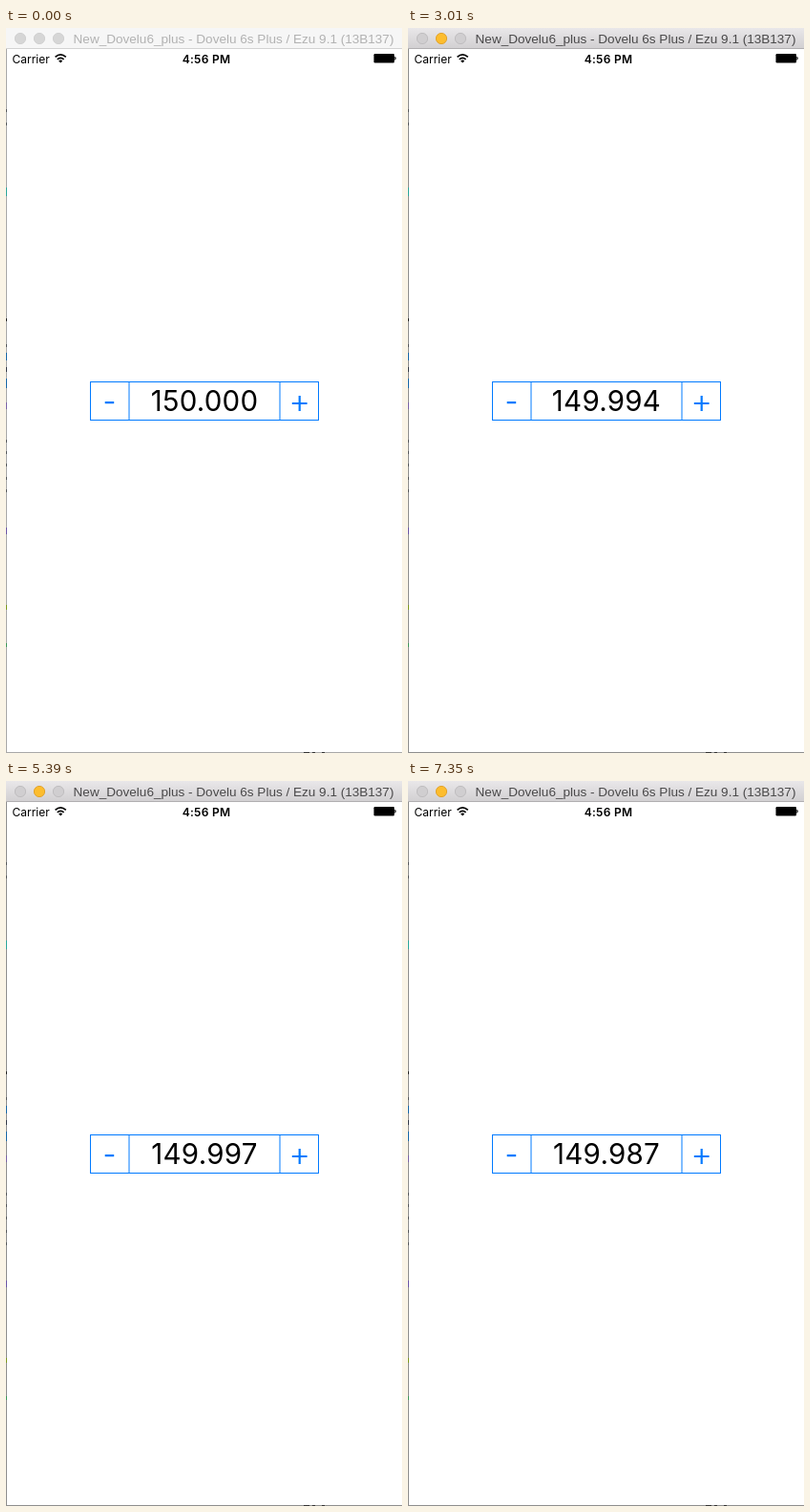
Animation, 415 px wide and 759 px high, one loop 8400 ms. Source, as an HTML page:

```html
<!DOCTYPE html>
<html lang="en">
<head>
<meta charset="utf-8">
<title>Stepper</title>
<style>
  html, body { margin: 0; width: 100%; height: 100%; overflow: hidden; background: #fff; }
  svg { display: block; width: 415px; height: 759px; }
  text { font-family: Inter, Roboto, sans-serif; }
  #title { font: 13.55px "Liberation Sans", Arial, sans-serif; }
  #value { font-size: 29.5px; letter-spacing: .25px; }
  .status { font-size: 12px; }
  .clock { font-weight: 600; letter-spacing: .25px; }
</style>
</head>
<body>
<svg viewBox="0 0 415 759" xmlns="http://www.w3.org/2000/svg">
  <defs>
    <linearGradient id="bar" x1="0" y1="0" x2="0" y2="1">
      <stop offset="0" stop-color="#e9e7e9"/>
      <stop offset="1" stop-color="#d2d0d2"/>
    </linearGradient>
  </defs>
  <rect width="415" height="759" fill="#fff"/>

  <!-- window frame -->
  <rect id="head" width="415" height="21"/>
  <rect id="rule" y="21" width="415" height="1"/>
  <g id="lights" stroke-width="1">
    <circle cx="15" cy="11" r="5.6"/>
    <circle cx="35" cy="11" r="5.6"/>
    <circle cx="55" cy="11" r="5.6"/>
  </g>
  <text id="title" x="238.5" y="16" text-anchor="middle">New_Dovelu6_plus - Dovelu 6s Plus / Ezu 9.1 (13B137)</text>
  <g id="edge">
    <rect y="22" width="1" height="737"/>
    <rect y="758" width="415" height="1"/>
  </g>
  <g id="specks"></g>

  <!-- status bar -->
  <text class="status" x="6.5" y="37">Carrier</text>
  <g fill="none" stroke="#000" stroke-width="1.7">
    <path d="M51.6 30.4Q57.2 25.4 62.8 30.4"/>
    <path d="M53.8 32.8Q57.2 29.8 60.6 32.8"/>
  </g>
  <path d="M55.2 34.4Q57.2 32.8 59.2 34.4L57.2 36.6Z"/>
  <text class="status clock" x="210" y="37" text-anchor="middle">4:56 PM</text>
  <rect x="385.5" y="27" width="21.5" height="9.5" rx="1.2"/>
  <path d="M407.7 30Q409.4 31.7 407.7 33.5Z" stroke="#000" stroke-width=".5"/>

  <!-- stepper -->
  <g fill="none" stroke="#007aff">
    <rect x="88.5" y="370.5" width="239" height="40"/>
    <path d="M129 371V410M287 371V410"/>
    <path d="M103.7 392.2H113.2M299.8 393H315.6M307.7 385.1V400.9" stroke-width="2.2"/>
  </g>
  <text id="value" x="208" y="400.5" text-anchor="middle">150.000</text>
</svg>
<script>
const LOOP = 8400, FOCUS = 1400;
const downs = [1400, 1680, 2030, 2310, 2660, 3010, 5250, 5390, 5740, 5950,
  6090, 6230, 6580, 6720, 6860, 7070, 7210, 7350];
const ups = [3850, 3990, 4200, 4340, 4550];
const $ = id => document.getElementById(id);
const set = (el, attrs) => {
  for (const k in attrs) el.setAttribute(k, attrs[k]);
};

function speck(x, y, w, h, fill) {
  const r = document.createElementNS("http://www.w3.org/2000/svg", "rect");
  set(r, { x, y, width: w, height: h, fill });
  $("specks").append(r);
}
// slivers of the desktop beside the window
[85, 99, 331, 431, 443, 456, 470, 483].forEach(y => speck(0, y, 1, 3, "#55585c"));
[[167, 9, "#2aa79b"], [304, 3, "#222"], [340, 8, "#1767a8"], [355, 5, "#333a48"],
  [367, 10, "#1767a8"], [392, 7, "#7a62a8"], [523, 7, "#6b55a8"],
  [604, 5, "#7d9a1c"], [644, 4, "#3b9a58"]].forEach(([y, h, c]) => speck(0, y, 1, h, c));
[[312, 6], [321, 3], [331, 3]].forEach(([x, w]) => speck(x, 758, w, 1, "#333"));

const passed = (list, t) => list.filter(s => s <= t).length;

function draw(t) {
  const active = t >= FOCUS;
  set($("head"), { fill: active ? "url(#bar)" : "#f6f6f6" });
  set($("rule"), { fill: active ? "#b1afb1" : "#d3d3d3" });
  set($("edge"), { fill: active ? "#8e8e8e" : "#a8a8a8" });
  set($("title"), { fill: active ? "#4a494a" : "#b2b2b2" });
  [...$("lights").children].forEach((c, i) => {
    const lit = active && i === 1;
    set(c, {
      fill: lit ? "#fdbd2e" : active ? "#d0ced0" : "#d6d6d6",
      stroke: lit ? "#e2a32a" : active ? "#bfbdbf" : "#d0d0d0"
    });
  });
  const n = 150000 - passed(downs, t) + passed(ups, t);
  $("value").textContent = (n / 1000).toFixed(3);
}

const start = performance.now();
function tick() {
  draw((performance.now() - start) % LOOP);
  requestAnimationFrame(tick);
}
draw(0);
requestAnimationFrame(tick);
</script>
</body>
</html>
```
